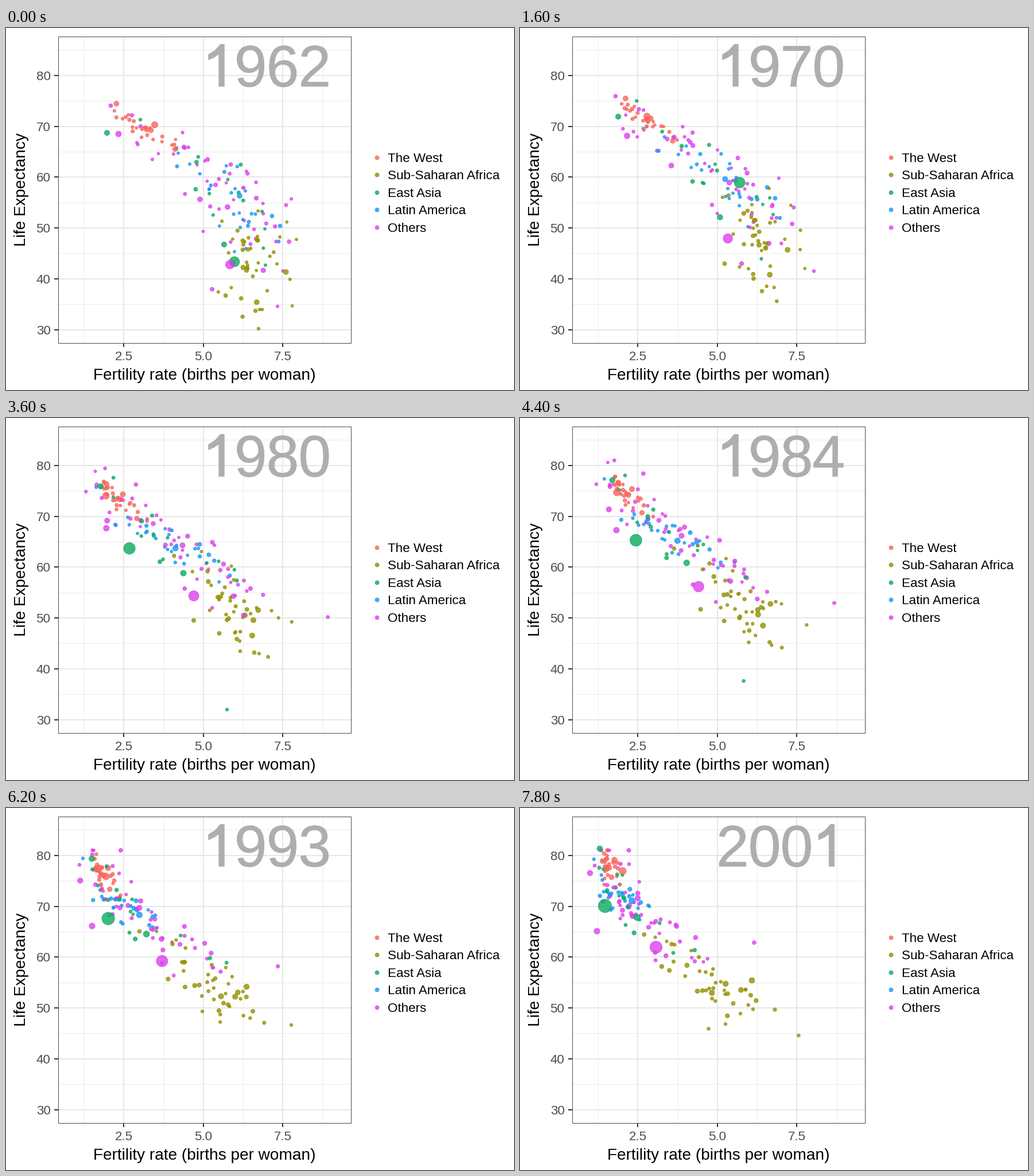
A matplotlib script for the animation above (8 s loop, 885x632 px).

```python
import numpy as np
import matplotlib.pyplot as plt
from matplotlib.animation import FuncAnimation
from matplotlib.colors import to_rgba
from matplotlib.patches import Polygon, Rectangle
from matplotlib.patheffects import withStroke

W, H, DPI = 885, 632, 64
FIRST, LAST = 1962, 2001
LEFT, RIGHT, TOP, BOTTOM = 90.5, 600.5, 14.5, 549.5
YEAR_SIZE, YEAR_STEP, YEAR_X, YEAR_Y = 102, 55.8, 342, 102
YEAR_COLOR = "#AEAEAE"
ONE = np.array([(.375, 0), (.283, 0), (.283, .555), (.2, .497), (.105, .455),
                (.105, .545), (.215, .615), (.29, .7), (.31, .72), (.375, .72)])

COLORS = {
    "The West": "#F8655C",
    "Sub-Saharan Africa": "#929000",
    "East Asia": "#0BAA5E",
    "Latin America": "#1597F5",
    "Others": "#DC41EE",
}

# Dot count, life expectancy at start and end, its spread at start and end,
# ease-out power of the rise, and spread of the fertility rate.
CROWDS = {
    "The West": (28, (69.5, 78), (2.6, 2), 1.1, .5),
    "Sub-Saharan Africa": (43, (43, 54), (5.5, 5.5), 2.3, .75),
    "East Asia": (13, (58, 72), (7, 6), 1.4, .75),
    "Latin America": (28, (58, 73), (7, 3.2), 1.5, .75),
    "Others": (50, (56, 70), (9.5, 6), 1.4, 1),
}

# Dots that stand out: group, first and last radius, then stage positions
# reached at even steps of time.
TRACKS = [
    ("East Asia", 9.3, 12, [(398, 408), (418, 275), (265, 253), (200, 220),
                            (205, 203), (170, 190), (148, 171)]),
    ("Others", 8, 11, [(390, 413), (322, 302), (237, 243)]),
    ("East Asia", 5, 6, [(380, 378), (303, 262), (204, 191)]),
    ("East Asia", 5, 5.3, [(176, 183), (164, 114), (139, 71)]),
    ("The West", 6, 6.6, [(259, 169), (167, 133), (179, 110)]),
    ("Others", 5.4, 5.6, [(196, 185), (173, 193), (134, 215)]),
    ("Latin America", 4.8, 5.8, [(407, 293), (286, 222), (195, 162)]),
    ("Sub-Saharan Africa", 4.3, 5.3, [(419, 423), (441, 328), (404, 301)]),
    ("Sub-Saharan Africa", 3.2, 3.6, [(440, 525), (458, 408), (444, 352)]),
    ("Others", 3.1, 3.8, [(473, 486), (568, 336), (408, 235)]),
    ("East Asia", 3, 3.4, [(452, 414), (426, 408), (402, 386), (380, 546),
                           (405, 320), (378, 255), (267, 253)]),
]


def pt(px):
    return px * 72 / DPI


def px_x(value):
    return 66.8 + 55.4 * value


def px_y(value):
    return 793 - 8.878 * value


def mix(a, b, t):
    return a + (b - a) * t


def label(x, y, text, size=22.4, color="black", **kw):
    return ax.text(x, y, text, fontsize=pt(size), color=color,
                   family="Liberation Sans", va="baseline", **kw)


def line(xs, ys, color, width, z):
    ax.plot(xs, ys, color=color, lw=pt(width), zorder=z, solid_capstyle="butt")


def dot_style(names):
    rgba = [to_rgba(COLORS[n], .8) for n in names]
    return dict(facecolors=rgba, edgecolors=rgba, linewidths=pt(1))


def areas(radii):
    return pt(2 * np.asarray(radii) - 1) ** 2


def fertility(life, t):
    """Births fall along a logistic curve as lives get longer.

    Returns the rate and how far up the curve it lies (0 to 1).
    """
    middle, width = 65.5 - 4.5 * t ** 3, mix(4.5, 6, t)
    level = 1 / (1 + np.exp((life - middle) / width))
    return mix(1.7, 1.3, t) + 5.1 * level, level


class Crowd:
    def __init__(self, name, rng):
        self.count, self.life, self.spread, self.power, self.scatter = CROWDS[name]
        self.a, self.b = np.clip(rng.normal(size=(2, 2, self.count)), -1.9, 1.9)
        self.radii = 2.8 + np.minimum(rng.exponential(.55, self.count), 2)

    def at(self, t):
        # Each dot's own deviation turns slowly, so the spread stays the same.
        dx, dy = self.a * np.cos(1.4 * t) + self.b * np.sin(1.4 * t)
        rise = 1 - (1 - t) ** self.power
        life = mix(*self.life, rise) + mix(*self.spread, t) * dy
        rate, level = fertility(life, t)
        rate = rate + self.scatter * (.35 + .65 * level) * dx
        return np.column_stack([px_x(np.clip(rate, .95, 8.4)), px_y(np.minimum(life, 81))])


def follow(path, t):
    steps = np.linspace(0, 1, len(path))
    return [np.interp(t, steps, axis) for axis in zip(*path)]


fig = plt.figure(figsize=(W / DPI, H / DPI), dpi=DPI, facecolor="white")
ax = fig.add_axes([0, 0, 1, 1])
ax.set(xlim=(0, W), ylim=(H, 0))
ax.axis("off")

# Panel, grid and axes
for v in np.arange(1.25, 9, 2.5):
    line([px_x(v)] * 2, [TOP, BOTTOM], "#EBEBEB", 1, 1)
for v in range(35, 90, 10):
    line([LEFT, RIGHT], [px_y(v)] * 2, "#EBEBEB", 1, 1)
for v in (2.5, 5, 7.5):
    x = px_x(v)
    line([x, x], [TOP, BOTTOM], "#E7E7E7", 2, 1.1)
    line([x, x], [BOTTOM, BOTTOM + 7], "#333333", 2, 2)
    label(x, 580, f"{v:.1f}", color="#4D4D4D", ha="center")
for v in range(30, 90, 10):
    y = px_y(v)
    line([LEFT, RIGHT], [y, y], "#E7E7E7", 2, 1.1)
    line([LEFT - 7, LEFT], [y, y], "#333333", 2, 2)
    label(77.5, y + 8, str(v), color="#4D4D4D", ha="right")
ax.add_patch(Rectangle((LEFT, TOP), RIGHT - LEFT, BOTTOM - TOP, fill=False,
                       ec="#4A4A4A", lw=pt(1), zorder=6))
label(345.5, 614, "Fertility rate (births per woman)", 28, ha="center")
label(34, 282, "Life Expectancy", 28, rotation=90, ha="center", rotation_mode="anchor")

# Legend
for i, name in enumerate(COLORS):
    y = 226 + 30.4 * i
    ax.scatter([646], [y], s=areas([3.9]), **dot_style([name]))
    label(665, y + 8, name)

# Year, with a footless figure one
digits, ones = [], []
for i in range(4):
    x = YEAR_X + i * YEAR_STEP
    digits.append(label(x, YEAR_Y, "", YEAR_SIZE, YEAR_COLOR, zorder=3, path_effects=[
        withStroke(linewidth=pt(.8), foreground=YEAR_COLOR)]))
    ones.append(ax.add_patch(Polygon(ONE * (YEAR_SIZE, -YEAR_SIZE) + (x, YEAR_Y), fc=YEAR_COLOR,
                                     ec=YEAR_COLOR, lw=pt(.8), zorder=3)))

# Dots
rng = np.random.default_rng(7)
crowds = [Crowd(name, rng) for name in CROWDS]
names = np.repeat(list(CROWDS), [c.count for c in crowds])
order = rng.permutation(len(names))
base_radii = np.concatenate([c.radii for c in crowds])[order]
groups = list(names[order]) + [track[0] for track in TRACKS]
dots = ax.scatter(np.zeros(len(groups)), np.zeros(len(groups)), s=9, zorder=4,
                  **dot_style(groups))


def draw(frame):
    t = frame / (LAST - FIRST)
    crowd = np.concatenate([c.at(t) for c in crowds])[order]
    dots.set_offsets(np.vstack([crowd, [follow(track[3], t) for track in TRACKS]]))
    marked = [mix(r0, r1, t) for _, r0, r1, _ in TRACKS]
    dots.set_sizes(areas(np.concatenate([base_radii * mix(1, 1.08, t), marked])))
    for char, digit, one in zip(str(FIRST + frame), digits, ones):
        digit.set_text("" if char == "1" else char)
        one.set_visible(char == "1")
    return [dots, *digits, *ones]


anim = FuncAnimation(fig, draw, frames=LAST - FIRST + 1, interval=200,
                     repeat=True, repeat_delay=0)
plt.show()
```
